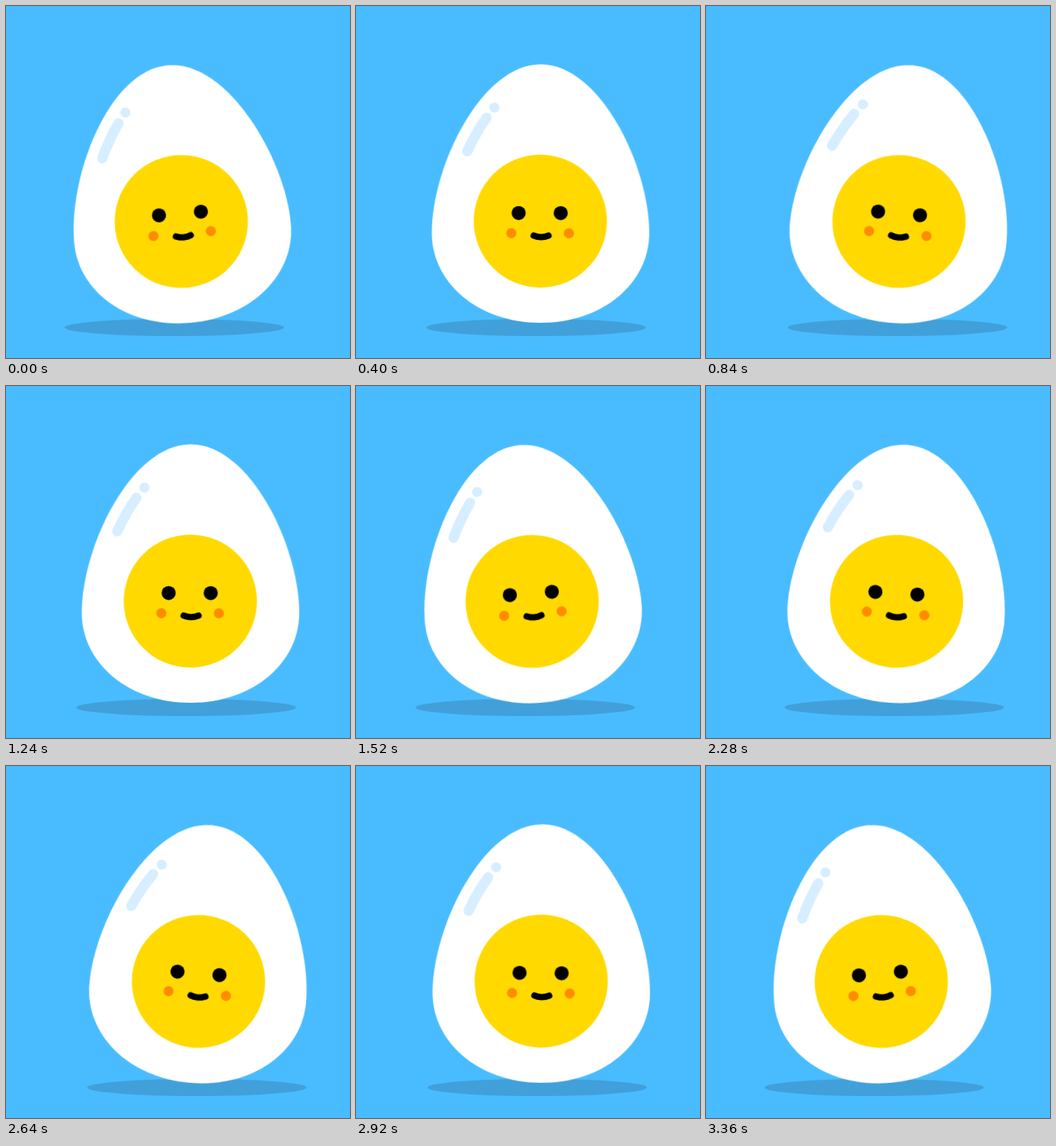
These frames come from a looping animation (439 px wide and 450 px high, 3.4 s). An HTML page:

```html
<!DOCTYPE html>
<html lang="en">
<head>
<meta charset="utf-8">
<title>Rocking egg</title>
<style>
  html, body { margin: 0; width: 100%; height: 100%; overflow: hidden; background: #49bcff; }
  svg { display: block; width: 439px; height: 450px; }
  #egg { transform-origin: 235px 405px; }
</style>
</head>
<body>
<svg viewBox="0 0 439 450">
  <ellipse id="shadow" cx="229.5" cy="411" rx="140" ry="11" fill="#41a0da"/>
  <g id="egg">
    <path fill="#fff" d="M235.2 74.5 C311 74.5 374 205 374 290 C374 354 315 405 235.2 405 C155.4 405 96.5 354 96.5 290 C96.5 205 159.4 74.5 235.2 74.5Z"/>
    <g fill="none" stroke="#d6eeff" stroke-width="13" stroke-linecap="round">
      <path d="M166 143 Q152 163 141.5 186"/>
      <path d="M176 130h.01"/>
    </g>
    <circle cx="235" cy="275" r="85" fill="#ffd900"/>
    <g fill="#ff8c00">
      <circle cx="198" cy="290.5" r="6.5"/>
      <circle cx="271.5" cy="290.5" r="6.5"/>
    </g>
    <circle cx="207.3" cy="264.7" r="9"/>
    <circle cx="261" cy="264.7" r="9"/>
    <path d="M226.5 293.5 Q236 297.5 245.5 293.5" fill="none" stroke="#000" stroke-width="8" stroke-linecap="round"/>
  </g>
</svg>
<script>
  const LOOP = 3400, STEP = 40, SWING = 850, LEAD = 30;

  // cubic-bezier(.5, 0, .5, 1), solved by bisection
  function ease(x) {
    let lo = 0, hi = 1;
    for (let i = 0; i < 30; i++) {
      const s = (lo + hi) / 2;
      if (1.5 * s * (1 - s) + s ** 3 < x) lo = s; else hi = s;
    }
    return lo * lo * (3 - 2 * lo);
  }

  // -1 is fully left, 1 is fully right
  function lean(ms) {
    const u = ((ms + LEAD) / SWING) % 2;
    return 2 * ease(u < 1 ? u : 2 - u) - 1;
  }

  function play(id, pose) {
    const frames = [];
    for (let t = 0; t <= LOOP; t += STEP) {
      frames.push({ offset: t / LOOP, transform: pose(lean(t)), easing: 'steps(1, end)' });
    }
    const anim = document.getElementById(id).animate(frames, { duration: LOOP, iterations: Infinity });
    anim.startTime = 0;
  }

  play('egg', k => `rotate(${5 * k}deg)`);
  play('shadow', k => `translateX(${15 * k}px)`);
</script>
</body>
</html>
```
